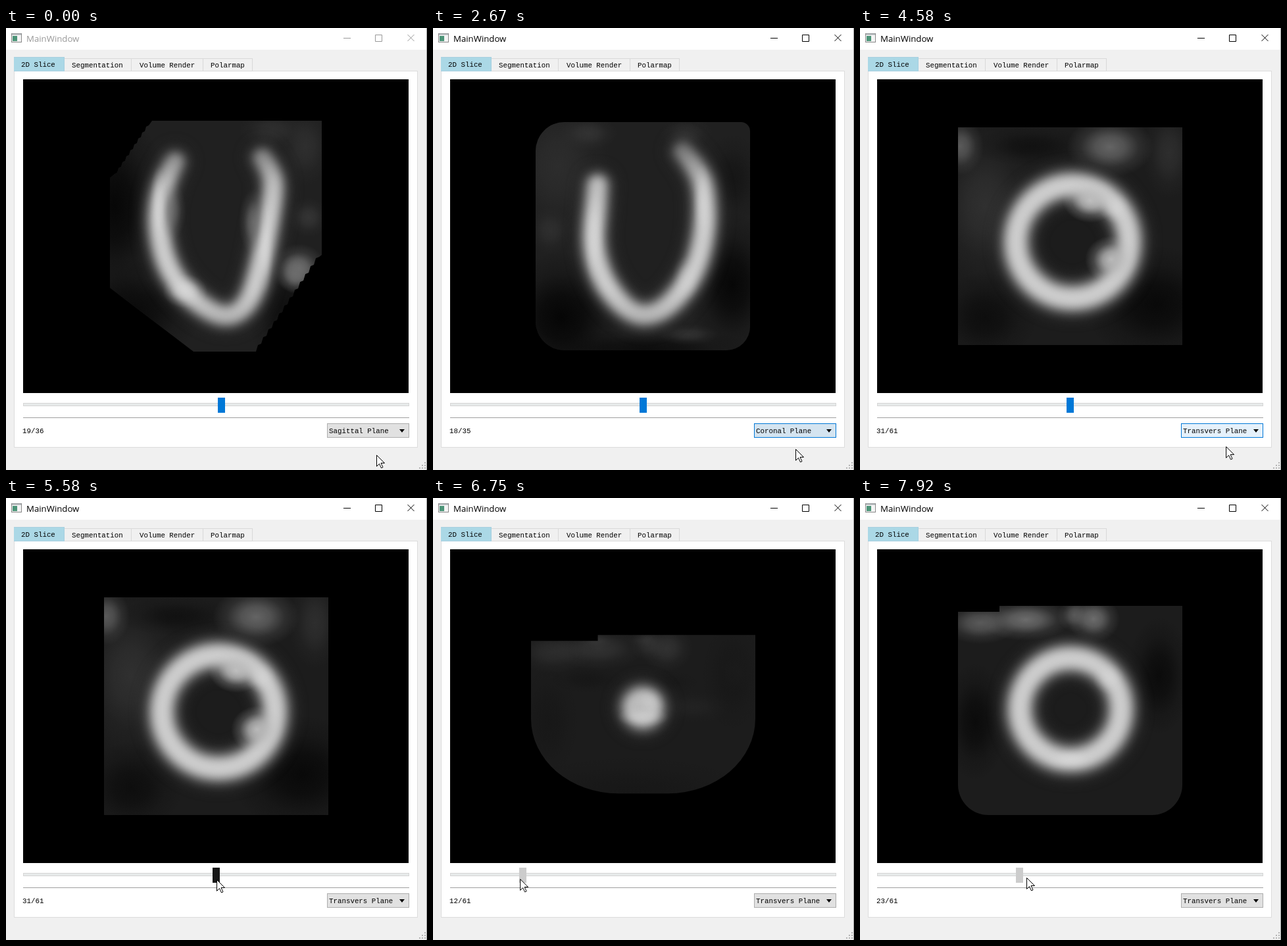
Animation of 640 by 672 pixels, one loop 8000 ms. Source, as an HTML page with a canvas:

```html
<!DOCTYPE html>
<html lang="en">
<head>
<meta charset="utf-8">
<title>MainWindow</title>
<style>
html, body { margin: 0; width: 100%; height: 100%; overflow: hidden; }
body { position: relative; background: #f0f0f0; font: 10.8px/14px "Liberation Mono", monospace; color: #000; }
body *, body *::before { position: absolute; box-sizing: border-box; white-space: pre; }
.stage { left: 0; top: 0; width: 640px; height: 672px; overflow: hidden; }

.bar { left: 0; top: 0; width: 640px; height: 33px; background: #fff; animation: activate 8s infinite; }
.bar span { left: 31px; top: 7px; font: 13.2px/18px "Open Sans", sans-serif; }
.bar svg { left: 0; top: 0; fill: none; stroke: currentColor; }
@keyframes activate { 0%, 18% { color: #999; } 20.5%, 100% { color: #000; } }

.tab { top: 46px; height: 20px; padding: 3px 0 0 11px; border: 1px solid #d9d9d9; border-left: 0; background: #f0f0f0; }
.tab.on { top: 44px; height: 22px; padding-top: 4px; border-color: #a8d0e0; background: #abd8e6; }
.panel { left: 12px; top: 65px; width: 614px; height: 573px; background: #fff; border: 1px solid #dcdcdc; }
canvas { left: 26px; top: 78px; background: #000; }

.groove { left: 26px; top: 570px; width: 587px; height: 5px; background: #e7eaea; border: 1px solid #d6d6d6; }
.handle { top: 562px; width: 11px; height: 23px; background: #0078d7; animation: handle 8s step-end infinite; }
@keyframes handle { 0% { background: #0078d7; } 68.4% { background: #171717; } 73.5% { background: #ccc; } }
.rule { left: 26px; top: 592px; width: 587px; height: 1px; background: #a0a0a0; }
.count { left: 25px; top: 606px; }

.combo { left: 488px; top: 601px; width: 125px; height: 22px; padding: 4px 0 0 2px; background: #e1e1e1; border: 1px solid #adadad; animation: hover 8s infinite; }
.combo::before { content: ""; left: 109px; top: 8px; border: 4.5px solid transparent; border-top: 5px solid #000; border-bottom: 0; }
@keyframes hover {
  0%, 16% { background: #e1e1e1; border-color: #adadad; }
  18%, 30% { background: #e5f1fb; border-color: #0078d7; }
  33.4% { background: #d4e4f0; border-color: #0078d7; }
  37%, 43.5% { background: #e1e1e1; border-color: #adadad; }
  45.5%, 64.6% { background: #e5f1fb; border-color: #0078d7; }
  68%, 100% { background: #e1e1e1; border-color: #adadad; }
}

.pop { left: 488px; top: 623px; width: 122px; height: 37px; box-shadow: 4px 4px 3px #777; animation: shadow 8s step-end infinite; }
.list { left: 0; top: 0; width: 122px; height: 37px; background: #fff; border: 1px solid #7a7a7a; animation: list 8s step-end infinite; }
.list i { left: 0; width: 120px; height: 12px; padding-left: 2px; font-style: normal; line-height: 11px; }
.list .on { background: #0078d7; color: #fff; }
@keyframes shadow { 0% { opacity: 0; } 18.75% { opacity: 1; } 26% { opacity: 0; } 46.5% { opacity: 1; } 55% { opacity: 0; } }
@keyframes list { 0% { opacity: 0; } 19.8% { opacity: 1; } 26% { opacity: 0; } 47.6% { opacity: 1; } 55% { opacity: 0; } }

.grip { right: 1px; bottom: 1px; fill: #b4b4b4; }
.edge { right: 0; top: 0; width: 1px; height: 672px; background: #aaa; }
.cursor { left: -1px; top: -1px; fill: #fff; stroke: #000; animation: move 8s infinite; }
@keyframes move {
  0%, 10.5% { transform: translate(563px, 649px); }
  16.5%, 20.5% { transform: translate(555px, 612px); }
  25%, 33.4% { transform: translate(551px, 640px); }
  38%, 42.5% { transform: translate(563px, 648px); }
  46%, 48.5% { transform: translate(559px, 612px); }
  53%, 55.5% { transform: translate(557px, 651px); }
  62%, 64.6% { transform: translate(555px, 618px); }
  68.8%, 74.5% { transform: translate(320px, 580px); animation-timing-function: linear; }
  79.1% { transform: translate(210px, 580px); animation-timing-function: linear; }
  84.4% { transform: translate(132px, 579px); animation-timing-function: ease-out; }
  89.4% { transform: translate(61px, 578px); animation-timing-function: ease-in; }
  91.6% { transform: translate(84px, 577px); animation-timing-function: linear; }
  94.8% { transform: translate(140px, 577px); animation-timing-function: linear; }
  99%, 100% { transform: translate(253px, 577px); }
}
</style>
</head>
<body>
<div class="stage">
  <div class="bar">
    <svg width="640" height="33">
      <rect x="8.5" y="8.5" width="15" height="13" fill="#f4f4f4" stroke="#888"/>
      <path d="M9 9.5h14" stroke="#aab0b4" stroke-width="2"/>
      <path d="M10 12h7v8h-7z" fill="#4c9478" stroke="none"/>
      <path d="M513 15.5h11M561.5 10.5h10v10h-10zM610.5 10l10 10m0-10l-10 10"/>
    </svg>
    <span>MainWindow</span>
  </div>
  <div class="panel"></div>
  <div class="tab on" style="left:12px;width:77px">2D Slice</div>
  <div class="tab" style="left:89px;width:102px">Segmentation</div>
  <div class="tab" style="left:191px;width:109px;padding-left:12px">Volume Render</div>
  <div class="tab" style="left:300px;width:75px">Polarmap</div>
  <canvas width="586" height="477"></canvas>
  <div class="groove"></div>
  <div class="handle"></div>
  <div class="rule"></div>
  <div class="count"></div>
  <div class="combo"><span></span></div>
  <svg class="grip" width="11" height="11"><path d="M8 0h2v2h-2zM8 4h2v2h-2zM4 4h2v2h-2zM8 8h2v2h-2zM4 8h2v2h-2zM0 8h2v2h-2z"/></svg>
  <div class="pop"><div class="list"></div></div>
  <div class="edge"></div>
  <svg class="cursor" width="16" height="24"><path d="M1.5 1.5v17l4-4 3 6.500 2.500-1.200-3-6.300h5.500z"/></svg>
</div>
<script>
const $ = s => document.querySelector(s);
const g = $('canvas').getContext('2d');
const planes = ['Sagittal Plane', 'Coronal Plane', 'Transvers Plane'];
const counts = [36, 35, 61];

// Last value whose key has been reached
const step = (keys, t) => keys.reduce((v, k) => t >= k[0] ? k[1] : v, keys[0][1]);
// Piecewise linear value
function lerp(keys, t) {
  if (t <= keys[0][0]) return keys[0][1];
  for (let i = 1; i < keys.length; i++) {
    const [a, u] = keys[i - 1], [b, v] = keys[i];
    if (t <= b) return u + (v - u) * (t - a) / (b - a);
  }
  return keys[keys.length - 1][1];
}

const planeKeys = [[0, 0], [2080, 1], [4400, 2]];
const hotKeys = [[0, 0], [1850, 1], [4130, 2]];
const dragKeys = [[5980, 31], [6330, 20], [6750, 12], [7100, 5], [7200, 4], [7330, 6], [7580, 11], [7900, 23]];

function spline(p) {
  const path = new Path2D();
  path.moveTo(p[0], p[1]);
  for (let i = 2; i < p.length - 2; i += 2) {
    const last = i === p.length - 4;
    path.quadraticCurveTo(p[i], p[i + 1],
      last ? p[i + 2] : (p[i] + p[i + 2]) / 2, last ? p[i + 3] : (p[i + 1] + p[i + 3]) / 2);
  }
  return path;
}

// Soft ellipse of one gray level
function blob(x, y, rx, ry, level, a = 1) {
  if (a <= 0) return;
  const fill = g.createRadialGradient(0, 0, 0, 0, 0, 1);
  [1, .75, .25, 0].forEach((v, i) => fill.addColorStop(i / 3, `rgba(${level},${level},${level},${v * a})`));
  g.save();
  g.translate(x, y);
  g.scale(rx, ry);
  g.fillStyle = fill;
  g.fillRect(-1, -1, 2, 2);
  g.restore();
}

// Blurred band; fade lists [y, opacity] pairs
function wall(path, w, fade) {
  g.lineCap = 'round';
  for (const [k, level, blur] of [[1.45, 56, 9], [1.02, 135, 7], [.6, 204, 6]]) {
    const paint = g.createLinearGradient(0, 0, 0, 672);
    for (const [y, a] of fade) paint.addColorStop(y / 672, `rgba(${level},${level},${level},${a})`);
    g.filter = `blur(${blur}px)`;
    g.lineWidth = w * k;
    g.strokeStyle = paint;
    g.stroke(path);
  }
  g.filter = 'none';
}

function mask(path, fill) {
  g.clip(path);
  g.fillStyle = fill;
  g.fillRect(0, 0, 640, 672);
}

const arms = [[175, .25], [235, .8], [290, 1], [395, 1], [445, .7]];

function sagittal() {
  const edge = new Path2D('M222 141H480V345');
  for (let i = 0; i < 12; i++) {
    edge.lineTo(476 - i * 8, 348 + i * 12);
    edge.lineTo(471 - i * 8, 350 + i * 12);
  }
  edge.lineTo(380, 492);
  edge.lineTo(285, 492);
  edge.lineTo(158, 395);
  edge.lineTo(158, 228);
  for (let i = 0; i < 9; i++) {
    edge.lineTo(165 + i * 6, 222 - i * 9);
    edge.lineTo(169 + i * 6, 220 - i * 9);
  }
  mask(edge, '#202020');
  blob(165, 270, 80, 150, 4, .9);
  blob(190, 430, 110, 80, 4, .8);
  blob(425, 430, 60, 90, 4, .6);
  blob(405, 155, 50, 30, 50, .8);
  blob(455, 180, 40, 60, 50, .8);
  blob(460, 288, 30, 30, 54, .9);
  blob(445, 366, 42, 38, 108);
  blob(440, 374, 28, 30, 108);
  wall(spline([257, 202, 238, 236, 230, 300, 246, 370, 290, 420, 336, 443, 370, 420, 388, 360, 400, 290, 408, 240, 402, 215, 390, 196]), 37, arms);
  blob(376, 295, 22, 50, 120, .7);
  blob(252, 278, 22, 44, 120, .6);
  blob(232, 270, 14, 60, 222, .5);
  blob(272, 400, 34, 26, 222, .6);
  blob(394, 335, 13, 70, 222, .5);
}

function coronal() {
  const edge = new Path2D();
  edge.roundRect(156, 143, 326, 347, [44, 14, 36, 44]);
  mask(edge, '#202020');
  blob(190, 210, 80, 110, 46, .9);
  blob(195, 440, 100, 100, 4, .95);
  blob(455, 390, 70, 110, 4, .9);
  blob(320, 488, 180, 30, 8, .8);
  blob(455, 230, 50, 70, 6, .4);
  blob(236, 160, 44, 26, 54, .8);
  blob(385, 160, 40, 26, 48, .8);
  blob(178, 308, 34, 36, 52, .7);
  blob(388, 466, 46, 16, 56, .7);
  wall(spline([250, 238, 248, 270, 242, 330, 258, 385, 290, 426, 322, 440, 360, 424, 398, 372, 414, 310, 414, 250, 404, 215, 380, 186]), 38, arms);
  blob(245, 320, 15, 70, 218, .5);
  blob(410, 265, 15, 60, 222, .5);
  blob(385, 380, 22, 34, 215, .3);
}

function transverse(n) {
  const top = lerp([[3, 246], [6, 233], [20, 175], [23, 164], [31, 151]], n);
  const notch = lerp([[6, 200], [20, 318], [23, 212], [31, 149]], n);
  const bottom = lerp([[3, 375], [6, 402], [14, 465], [19, 482]], n);
  const rx = lerp([[6, 170], [14, 120], [20, 68], [23, 46], [30, 0]], n);
  const ry = lerp([[6, 125], [14, 110], [20, 68], [23, 46], [30, 0]], n);
  const edge = new Path2D();
  edge.moveTo(149, top + 9);
  edge.lineTo(notch, top + 9);
  edge.lineTo(notch, top);
  edge.lineTo(490, top);
  edge.lineTo(490, bottom - ry);
  edge.ellipse(490 - rx, bottom - ry, rx, ry, 0, 0, Math.PI / 2);
  edge.ellipse(149 + rx, bottom - ry, rx, ry, 0, Math.PI / 2, Math.PI);
  edge.closePath();
  mask(edge, '#1c1c1c');

  const low = lerp([[6, 1], [14, 0]], n);
  const mid = lerp([[8, 0], [20, .8], [23, 1], [30, 0]], n);
  const high = lerp([[23, 0], [31, 1]], n);
  // Apex
  blob(248, top + 8, 26, 13, 70, low);
  blob(320, top + 7, 26, 12, 64, low);
  blob(235, 276, 60, 22, 4, low * .8);
  blob(350, 280, 60, 20, 4, low * .6);
  blob(395, 318, 56, 24, 52, low);
  blob(458, 265, 24, 30, 48, low * .6);
  blob(300, bottom, 200, 60, 4, low * .8);
  // Middle
  blob(175, 340, 50, 90, 4, mid * .7);
  blob(455, 270, 50, 90, 4, mid * .7);
  blob(183, top + 26, 60, 32, 105, mid * .8);
  blob(252, top + 21, 70, 32, 108, mid);
  blob(326, top + 14, 26, 26, 108, mid * .7);
  blob(355, top + 20, 40, 36, 108, mid);
  // Base
  blob(190, 270, 80, 120, 50, high * .9);
  blob(450, 420, 110, 90, 4, high * .8);
  blob(190, 440, 80, 70, 4, high * .6);
  blob(260, 180, 90, 30, 10, high * .6);
  blob(470, 190, 40, 70, 50, high * .8);
  blob(380, 181, 66, 46, 100, high);
  blob(152, 180, 36, 44, 90, high);

  const r = lerp([[9, 2], [12, 14], [16, 48], [20, 69], [23, 77], [31, 86]], n);
  const a = lerp([[8, 0], [13, 1]], n);
  const cx = lerp([[20, 319], [31, 323]], n), cy = lerp([[20, 319], [31, 325]], n);
  if (!a) return;
  const ring = new Path2D();
  ring.arc(cx, cy, r, 0, 7);
  wall(ring, 43, [[0, a]]);
  blob(cx, cy + r, 40, 16, 222, a * (1 - high) * .5);
  blob(cx + r * .75, cy - r * .6, 24, 24, 220, a * .4);
  blob(350, 262, 42, 34, 190, high);
  blob(382, 352, 40, 36, 185, high);
}

const rows = planes.map((name, i) => {
  const row = document.createElement('i');
  row.textContent = name;
  row.style.top = i * 11.5 + 'px';
  $('.list').append(row);
  return row;
});

let shown = '';
function show(plane, n) {
  const key = plane + ':' + n;
  if (key === shown) return;
  shown = key;
  g.clearRect(0, 0, 586, 477);
  g.save();
  g.translate(-26, -78);
  [sagittal, coronal, transverse][plane](n);
  g.restore();
  $('.count').textContent = n + '/' + counts[plane];
  $('.combo span').textContent = planes[plane];
  $('.handle').style.left = 26 + Math.round(575 * (n - 1) / (counts[plane] - 1)) + 'px';
}

let start;
function tick(now) {
  start ??= now;
  const t = (now - start) % 8000;
  const plane = step(planeKeys, t);
  show(plane, plane < 2 ? 19 - plane : Math.round(lerp(dragKeys, t)));
  const hot = step(hotKeys, t);
  rows.forEach((row, i) => row.classList.toggle('on', i === hot));
  requestAnimationFrame(tick);
}
requestAnimationFrame(tick);
</script>
</body>
</html>
```
